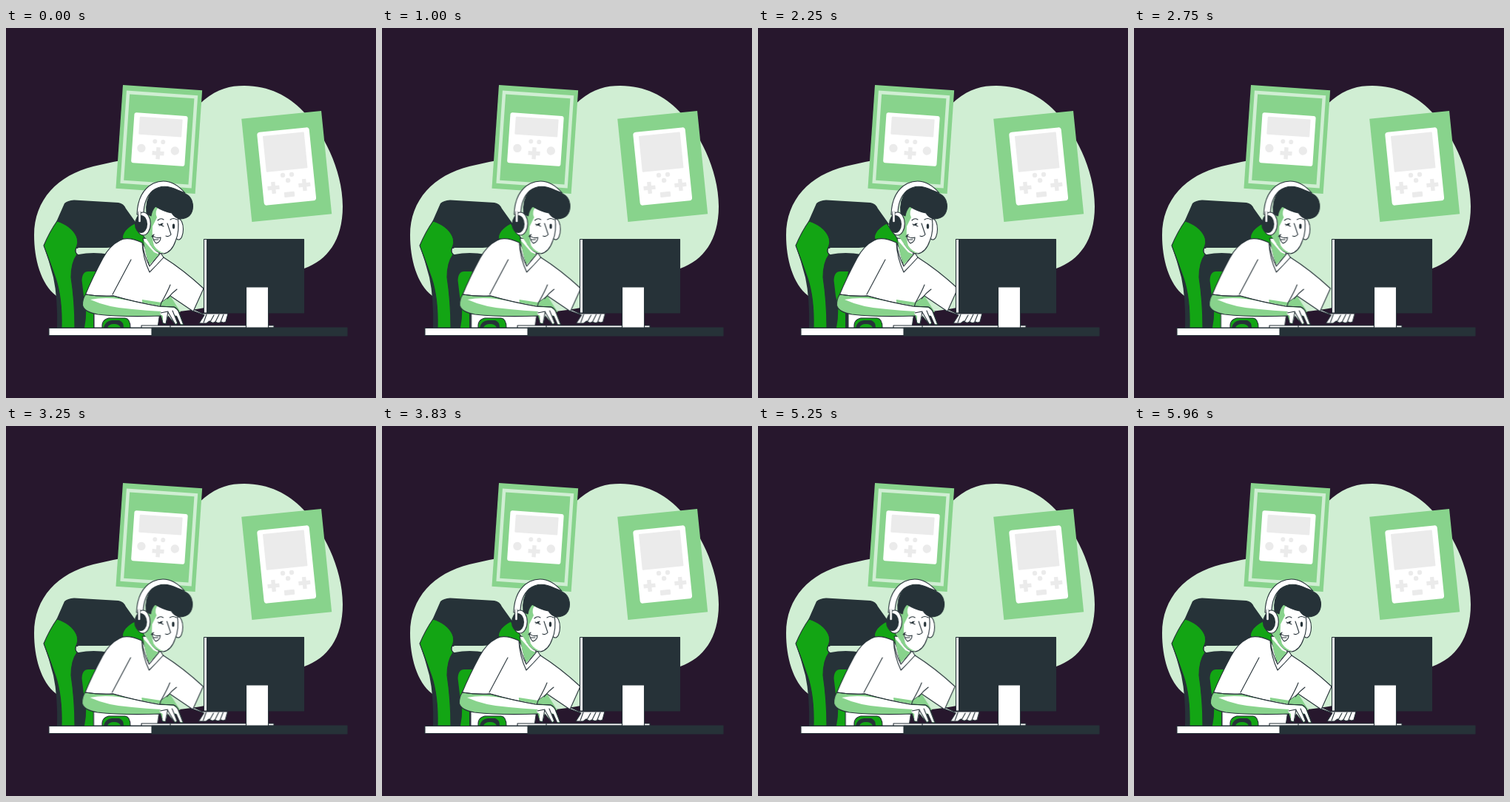
An HTML page that plays this animation: 500x500 px, repeating every 6 s.

```html
<!DOCTYPE html>
<html lang="en">
<head>
<meta charset="utf-8">
<title>Gamer at a desk</title>
<style>
  html, body { margin: 0; width: 100%; height: 100%; overflow: hidden; background: #27172d; }
  svg { display: block; width: 100vw; height: 100vh; }
  .pale { fill: #d0eed3; }
  .mid { fill: #88d38c; }
  .green { fill: #13a514; }
  .dark { fill: #263238; }
  .white { fill: #fff; }
  .grey { fill: #ebebeb; }
  .ink { stroke: #263238; stroke-width: 1.1; stroke-linejoin: round; stroke-linecap: round; }
  .line { fill: none; }
</style>
</head>
<body>
<svg viewBox="0 0 500 500">
  <defs>
    <path id="plus" d="M-2.7-8h5.4v5.3H8v5.4H2.7V8h-5.4V2.7H-8v-5.4h5.3z"/>
  </defs>

  <path class="pale" d="M38 280C38 232 70 199 118 187C154 178 190 176 218 150C240 129 251 111 268 97C286 82 303 78 322 78C355 78 382 92 401 112C427 139 455 190 455 241C455 287 434 314 403 325C365 339 330 364 282 375C225 390 110 391 68 362C47 346 38 312 38 280Z"/>

  <!-- posters -->
  <g transform="translate(206.8 150.5) rotate(3.9)">
    <rect class="mid" x="-53.7" y="-70" width="107.4" height="140"/>
    <rect x="-46" y="-60.5" width="92" height="121" fill="none" stroke="#d0eed3" stroke-width="4.5"/>
    <rect class="white" x="-35.6" y="-34" width="72.4" height="68" rx="3"/>
    <g class="grey">
      <rect x="-28" y="-29" width="58" height="24" rx="1"/>
      <circle cx="-23" cy="13.5" r="5.7"/><circle cx="22.5" cy="14" r="5.7"/>
      <circle cx="-5.3" cy="3" r="3"/><circle cx="5.7" cy="3.2" r="3"/>
      <use href="#plus" y="18.8"/>
    </g>
  </g>
  <g transform="translate(379.2 187) rotate(-5.8)">
    <rect class="mid" x="-54.2" y="-70" width="108.4" height="140"/>
    <rect class="white" x="-35.4" y="-49.7" width="70.8" height="99.4" rx="4"/>
    <g class="grey">
      <rect x="-28" y="-44" width="56" height="49" rx="1"/>
      <circle cx="-6.3" cy="11.3" r="3.2"/><circle cx="5.7" cy="11.5" r="3.2"/><circle cx="0" cy="19" r="3.2"/>
      <use href="#plus" x="-20.5" y="27"/><use href="#plus" x="21.5" y="27.3"/>
      <rect x="-7" y="34.5" width="14" height="7" rx="1"/>
    </g>
  </g>

  <!-- chair -->
  <path class="dark" d="M51 294L68 262L79 237Q83 233 92 232.500L152 236Q159 237 162 244L177 265L152 297H98Q93 299 97 306L104 304H145V405H69Q70 365 64 337Q58 314 51 294Z"/>
  <path class="pale" d="M95 298Q120 299 148 296L140 306Q118 302 98 306Q93 304 95 298Z"/>
  <path class="green ink" d="M51 294Q59 275 69 261Q88 267 95 281Q99 289 94 299Q93 303 96 306Q88 317 88 337Q93 370 93 405H75Q76 365 67 338Q59 315 51 294Z"/>
  <path class="green" d="M102.500 341Q103 329 111 329H122L118 350V405H106Q111 381 105 362Z"/>
  <path class="green ink" d="M174 264L190 287L188 297L158 285Q156 281 161 274Q166 268 174 264Z"/>

  <g id="player">
    <!-- far arm -->
    <path class="white ink" d="M253 380L266 386H300L297 397Q294 399 291 397Q287 400 283 397Q279 400 275 396L271 399H261L268 388L252 382Z"/>
    <path class="line ink" d="M281 388L276 397M288 387L283 397M294 387L290 397M271 387L267 398"/>

    <!-- shirt -->
    <path class="white ink" d="M184 290Q164 281 154 287Q140 294 131 311Q117 337 107.500 360L119 376V405H205L210 371L222 362L253 383L267 352Q240 327 213 310L196 312Z"/>
    <path class="mid" d="M184 367L210 371L222 362L236 384L228 384L210 376L184 371Z"/>
    <path class="line ink" d="M169 313L144 360M231 353Q224 358 218 366M222 347Q219 355 210 371L208 377"/>

    <!-- neck -->
    <path class="white ink" d="M185 284L194 323L208 303V286Z"/>
    <path class="mid" d="M186 287L200 303L207 306L194 320Q188 306 186 287Z"/>
    <path class="white ink" d="M184 290Q187 309 194 322L209 304L213 310Q204 320 194 330Q185 311 184 290Z"/>

    <!-- near arm -->
    <path class="mid ink" d="M107.500 360Q126 363 145 362Q177 371 206 376L227 377Q232 379 234 385L240 401H236L231 390L229 389L232 399L229 401L219 389L216 400L212 399L209 389Q160 391 124 387Q106 384 103.500 375Q103 367 107.500 360Z"/>
    <path class="white" d="M114 367Q140 362 174 370L209 377L227 378L232 382L239 400H236L231 389L228 388L231 398L229 400L219 388L216 399L212 398V389Q205 385 210 383Q190 382 171 380Q138 378 114 367Z"/>
    <path class="line ink" d="M107.500 360Q126 363 145 362Q177 371 206 376L227 377Q232 379 234 385L240 401M209 385L219 383L216 400M219 384L229 401M225 382L232 399M209 389L212 399"/>

    <!-- head -->
    <ellipse class="white ink" cx="233.200" cy="272" rx="6.300" ry="14"/>
    <path class="white ink" d="M194 242L195 292Q203 305 213 305Q224 303 229 288Q235 275 232 255L224 243Z"/>
    <path class="mid" d="M196 241H207Q200 248 204 256L198 268Q197 285 200 294Q205 302 214 304Q202 305 195 293L187 281L193 252Z"/>
    <path class="dark ink" d="M190 251Q188 233 197 221Q210 211 231 217Q236 221 240 223Q252 227 252.500 241Q252 257 236 258Q228 257 224 250Q213 248 202 241Q197 246 196 254Z"/>
    <path class="white ink" d="M177 252Q178 221 199 210Q222 200 242 223Q237 221 232 219Q212 209 198 220Q186 231 186 252Z"/>
    <ellipse class="white ink" cx="185.500" cy="264.500" rx="9.800" ry="15.500"/>
    <ellipse class="dark" cx="182.500" cy="265" rx="8.600" ry="12"/>
    <path d="M180.500 249V261" stroke="#263238" stroke-width="4" stroke-linecap="round"/>
    <path d="M180.500 248V261" stroke="#fff" stroke-width="2.600" stroke-linecap="round"/>

    <!-- face -->
    <path class="line ink" d="M205 260Q209 256 213 259M222 259Q226 256 231 259M206 265L213 268M207 267L212 264M218 264L223 279Q220 283 216 281"/>
    <ellipse class="dark" cx="226.500" cy="268" rx="1.700" ry="3.400"/>
    <circle class="dark" cx="210" cy="265.500" r="1.500"/>
    <path class="white ink" d="M198 280Q202 285 209 283Q209 289 203 291Q199 288 198 280Z"/>
    <path class="line ink" d="M197 282L200 279M200 286L206 286"/>
  </g>

  <!-- desk -->
  <path class="green ink" d="M130 405Q129 394 139 392H161Q168 393 168 405Z"/>
  <path class="dark" d="M132 405Q134 396 143 395H153Q159 397 159 405H155Q153 400 146 400Q139 400 137 405Z"/>
  <rect class="white ink" x="183" y="402" width="179" height="3"/>
  <path class="line ink" d="M222 402V405"/>
  <rect class="dark ink" x="197" y="405" width="264" height="11"/>
  <rect class="white ink" x="58" y="405.500" width="139" height="10"/>

  <rect class="dark ink" x="271.500" y="285.500" width="131" height="99.500"/>
  <rect class="white ink" x="267.500" y="285.500" width="4" height="99.500"/>
  <rect class="white ink" x="324.500" y="350" width="30" height="55"/>
</svg>
<script>
  const LOOP = 6000;
  // [time in ms, sideways shift]
  const sway = [
    [0, 0], [600, 0], [1190, 2], [1790, -5], [2400, 4.2], [2980, -4.6],
    [3570, 4.6], [4160, -4.4], [4770, 2.6], [5370, -1.2], [5970, 0], [LOOP, 0]
  ];
  const frames = sway.map(([time, x]) => ({
    offset: time / LOOP,
    transform: `translateX(${x}px)`,
    easing: 'cubic-bezier(.37, 0, .63, 1)'
  }));
  document.getElementById('player').animate(frames, { duration: LOOP, iterations: Infinity });
</script>
</body>
</html>
```
